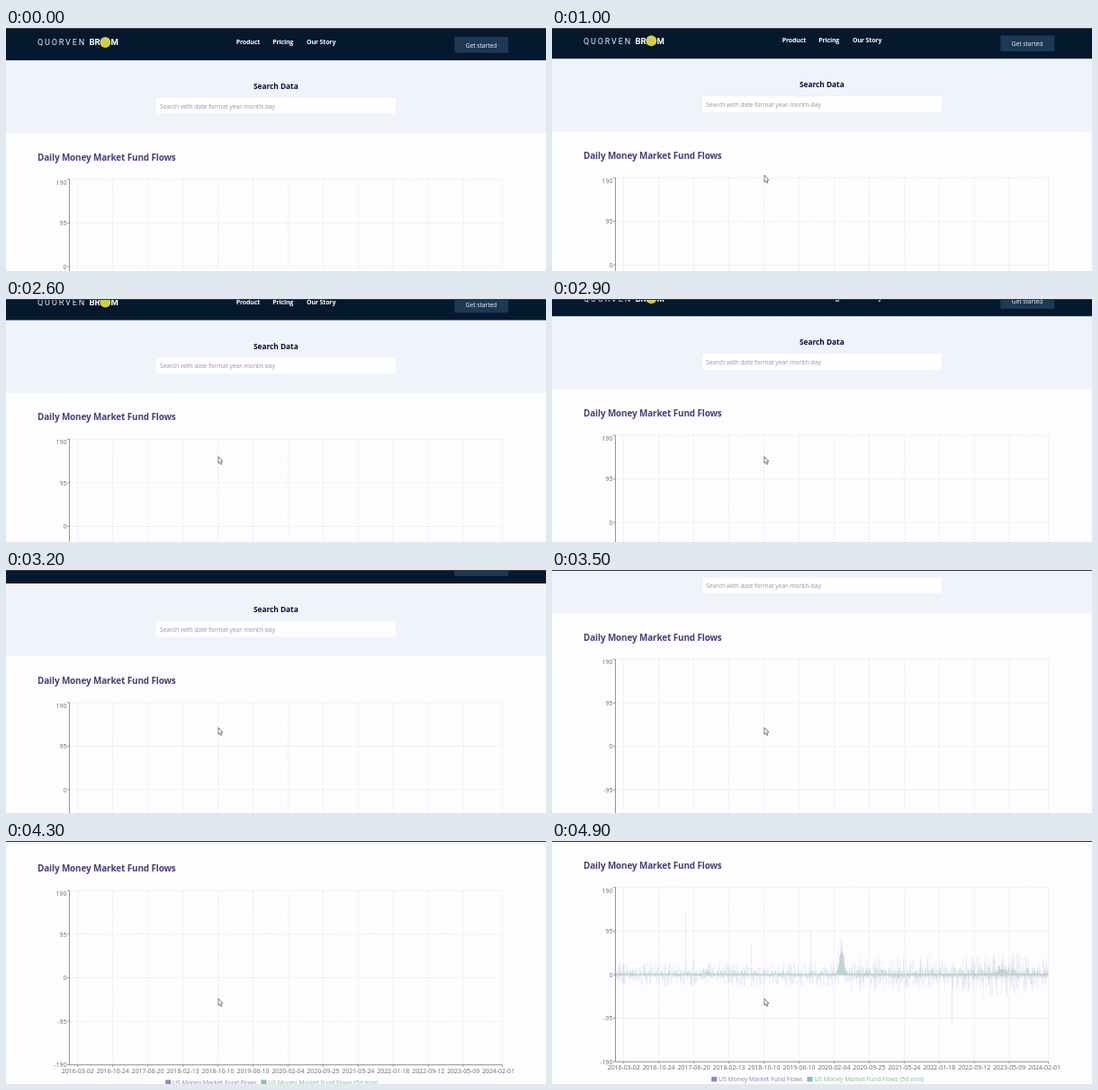
Write an HTML page with a canvas that moves like this. It is 600 px wide and 271 px high and loops after 5 s.

```html
<!DOCTYPE html>
<html lang="en">
<head>
<meta charset="utf-8">
<title>Daily Money Market Fund Flows</title>
<style>
html, body { margin: 0; width: 100%; height: 100%; overflow: hidden; background: #fdfcfe; }
canvas { display: block; width: 600px; height: 271px; }
</style>
</head>
<body>
<canvas id="stage"></canvas>
<script>
const W = 600, H = 271, LOOP = 5000, STEP = 100;
const SANS = '"Open Sans", "Noto Sans", sans-serif';
const LOGO = 'Roboto, sans-serif';
const canvas = document.getElementById('stage');
const ctx = canvas.getContext('2d');
const dpr = window.devicePixelRatio || 1;
canvas.width = W * dpr;
canvas.height = H * dpr;

// Motion: each function gives 0..1 between two times
const linear = u => u;
const smooth = u => u * u * (3 - 2 * u);
const easeOut = u => 1 - (1 - u) ** 3;
const glide = (t, start, end, ease = smooth) =>
  ease(Math.min(1, Math.max(0, (t - start) / (end - start))));

const scrollAt = t =>
  11 * glide(t, 900, 1300) +
  10 * glide(t, 2500, 3200, linear) +
  49 * glide(t, 3200, 3600, easeOut) +
  47 * glide(t, 3800, 4400);

const growthAt = t => 0.6 * glide(t, 4400, 4500) + 0.4 * glide(t, 4700, 4900);

function pointerAt(t) {
  const u = glide(t, 0, 500, easeOut);
  return [500 - 264 * u, 20 + 142 * u + 13.7 * glide(t, 900, 1300)];
}

// Chart geometry in page coordinates
const LEFT = 70.5, RIGHT = 551.5, ZERO = 266, ROW = 48.6;
const TOP = ZERO - 2 * ROW, BOTTOM = ZERO + 2 * ROW;
const DATES = ('2016-03-02 2016-10-24 2017-06-20 2018-02-13 2018-10-10 2019-06-10 2020-02-04 ' +
  '2020-09-25 2021-05-24 2022-01-18 2022-09-12 2023-05-09 2024-02-01').split(' ');
const columnX = i => Math.min(RIGHT, 79.7 + i * 38.95 + (i === DATES.length - 1 ? 5 : 0));
const rowY = i => TOP + i * ROW;

function makeRandom(seed) {
  return () => (seed = (seed * 16807) % 2147483647) / 2147483647;
}

// Daily flows and their smoothed average, in pixels from zero
function makeSeries() {
  const rnd = makeRandom(4271);
  const bump = (x, c, w) => Math.exp(-(((x - c) / w) ** 2));
  const list = [];
  for (let x = LEFT + 0.5; x < RIGHT; x += 0.5) {
    const surge = bump(x, 321.5, 3.2);
    const size = (x < 318 ? 0.7 : 1) + 0.3 * bump(x, 500, 30);
    const crest = 25 * surge + 5 * bump(x, 499, 5);
    const spread = (base, rise, power) => size * (base + rise * rnd() ** power);
    list.push({
      x,
      up: spread(1, 20, 3) + crest,
      down: spread(1, 19, 3) * (1 - 0.7 * surge),
      avgUp: spread(0.5, 7, 4) + crest,
      avgDown: spread(0.5, 4, 3) * (1 - surge)
    });
  }
  return list;
}
const series = makeSeries();
const SPIKES = [[148.5, 71], [221.5, 36], [287, 48], [444.5, -55]];

function text(str, x, mid, size, color, { weight = 400, gap = 0, align = 'left', font = SANS } = {}) {
  ctx.font = `${weight} ${size}px ${font}`;
  ctx.letterSpacing = gap + 'px';
  ctx.textAlign = align;
  ctx.fillStyle = color;
  ctx.fillText(str, x, mid + size * 0.36);
}

function rect(x, y, w, h, color) {
  ctx.fillStyle = color;
  ctx.fillRect(x, y, w, h);
}

function box(x, y, w, h, color) {
  ctx.fillStyle = color;
  ctx.beginPath();
  ctx.roundRect(x, y, w, h, 1);
  ctx.fill();
}

function line(x0, y0, x1, y1) {
  ctx.beginPath();
  ctx.moveTo(x0, y0);
  ctx.lineTo(x1, y1);
  ctx.stroke();
}

function drawHeader() {
  rect(0, 0, W, 36.2, '#04182e');
  text('QUORVEN', 35, 16, 9, '#eceff3', { font: LOGO, gap: 1.85 });
  text('BR', 92.5, 16, 9.5, '#fff', { font: LOGO, weight: 700 });
  text('M', 116.6, 16, 9.5, '#fff', { font: LOGO, weight: 700 });
  ctx.fillStyle = '#d3cf45';
  ctx.beginPath();
  ctx.arc(110.3, 16, 6, 0, 7);
  ctx.fill();

  const nav = { weight: 700, gap: -0.15 };
  text('Product', 255.7, 15.5, 7, '#fff', nav);
  text('Pricing', 296.2, 15.5, 7, '#fff', nav);
  text('Our Story', 334, 15.5, 7, '#fff', nav);
  box(498.3, 10, 60, 17.7, '#1c3955');
  text('Get started', 510.5, 19, 7, '#e9eef4', { gap: -0.15 });
}

function drawSearch() {
  rect(0, 36.2, W, 80.8, '#eef4f9');
  text('Search Data', 275, 65, 8.4, '#0b0b38', { weight: 700, gap: -0.05 });
  box(167, 78, 266, 17.6, '#fefdff');
  text('Search with date format year-month-day', 171, 87, 7, '#9a9a9e', { gap: -0.12 });
}

function drawGrid() {
  ctx.strokeStyle = '#dddde1';
  ctx.lineWidth = 0.6;
  ctx.setLineDash([1.9, 1.2]);
  for (let i = 0; i < 5; i++) line(LEFT, rowY(i), RIGHT, rowY(i));
  DATES.forEach((d, i) => line(columnX(i), TOP, columnX(i), BOTTOM));
  ctx.setLineDash([]);
}

function drawData(grow) {
  const bar = (x, up, down, w, color) => rect(x, ZERO - up * grow, w, (up + down) * grow, color);
  for (const p of series) bar(p.x, p.up, p.down, 0.5, 'rgba(186,194,218,0.4)');
  for (const [x, h] of SPIKES) bar(x, h, 0, 0.6, 'rgba(190,200,214,0.6)');
  for (const p of series) bar(p.x, p.avgUp, p.avgDown, 0.5, 'rgba(158,190,188,0.6)');
}

function drawAxes() {
  ctx.strokeStyle = '#88888c';
  ctx.lineWidth = 0.9;
  line(LEFT, TOP, LEFT, BOTTOM);
  line(LEFT, BOTTOM, RIGHT, BOTTOM);
  for (let i = 0; i < 5; i++) {
    const y = rowY(i);
    line(LEFT - 2.5, y, LEFT, y);
    text(String(190 - 95 * i), 67.4, Math.max(y + 0.2, TOP + 3.4), 7, '#6c6c70', { align: 'right' });
  }
  DATES.forEach((d, i) => {
    const x = columnX(i);
    line(x, BOTTOM, x, BOTTOM + 2);
    text(d, Math.min(x, 547), BOTTOM + 6.3, 7, '#6c6c70', { align: 'center', gap: -0.05 });
  });
}

function drawLegend() {
  const y = 382.6, name = 'US Money Market Fund Flows';
  const entry = (x, label, color) => {
    rect(x, y - 2.6, 6, 5.4, color);
    text(label, x + 7.8, y, 7, color, { gap: -0.1 });
  };
  entry(177.2, name, '#8d87bb');
  entry(283.5, name + ' (5d m/a)', '#88be9a');
}

function drawPointer(x, y) {
  ctx.save();
  ctx.translate(x, y);
  const shape = new Path2D('M0 0V7.6L1.6 6.2 2.7 8.7 3.9 8.2 2.8 5.7 4.9 5.4Z');
  ctx.fillStyle = '#fff';
  ctx.fill(shape);
  ctx.strokeStyle = '#48484c';
  ctx.lineWidth = 0.7;
  ctx.stroke(shape);
  ctx.restore();
}

function draw(t) {
  ctx.setTransform(dpr, 0, 0, dpr, 0, 0);
  rect(0, 0, W, H, '#fdfcfe');
  ctx.save();
  ctx.translate(0, -scrollAt(t));
  drawHeader();
  drawSearch();
  text('Daily Money Market Fund Flows', 35, 144.2, 9.9, '#463f78', { weight: 700, gap: -0.1 });
  drawGrid();
  drawData(growthAt(t));
  drawAxes();
  drawLegend();
  ctx.restore();
  rect(0, 0, W, 1, '#36363e');
  if (t >= 100) drawPointer(...pointerAt(t));
}

function frame() {
  const t = performance.now() % LOOP;
  draw(Math.floor(t / STEP) * STEP);
  requestAnimationFrame(frame);
}
frame();
</script>
</body>
</html>
```
